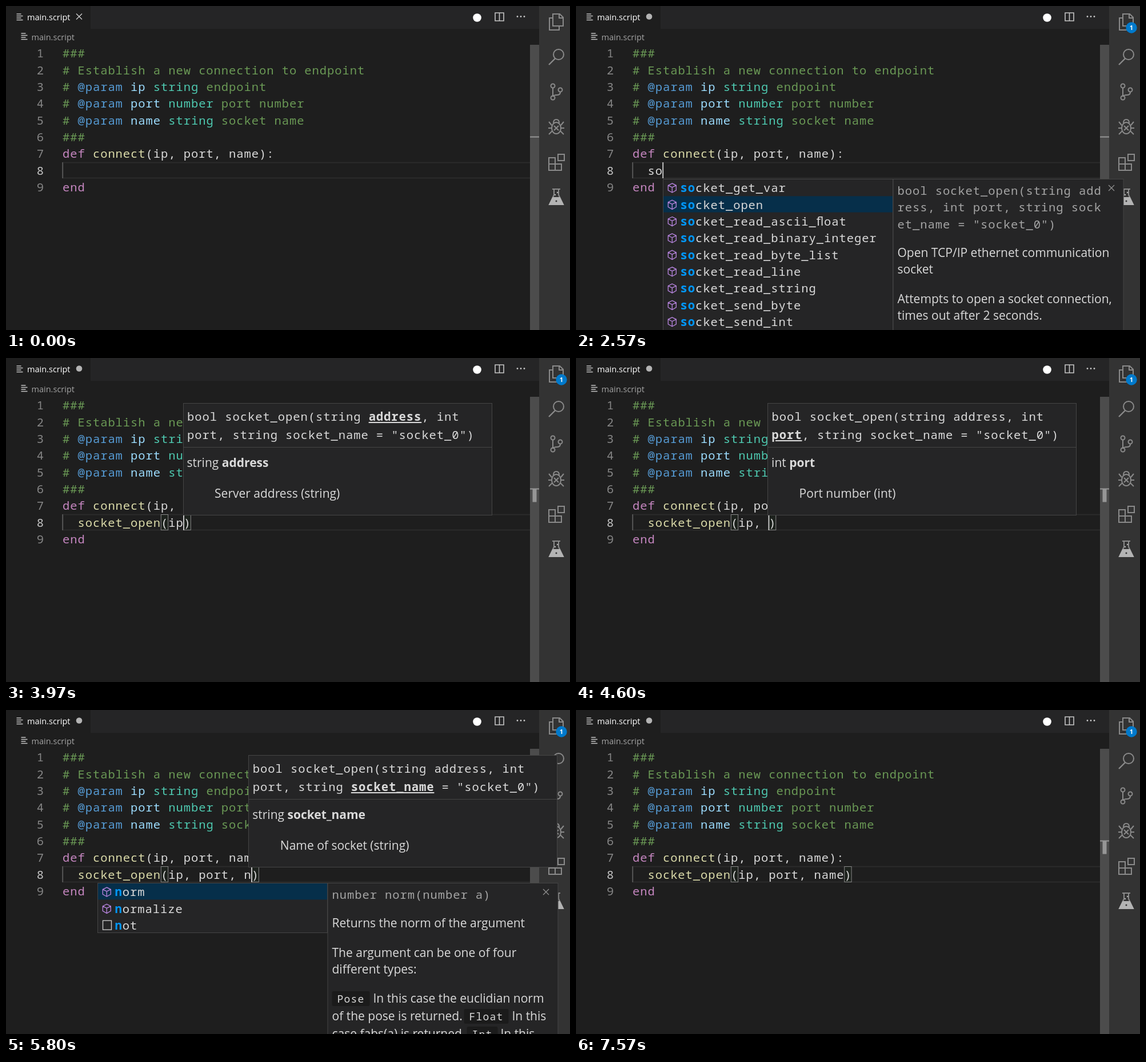
Write an HTML page that moves like this. It is 987x568 px and loops after 8.01 s.

```html
<!DOCTYPE html>
<html lang="en">
<head>
<meta charset="utf-8">
<title>Editor completion</title>
<style>
html, body { margin: 0; width: 100%; height: 100%; overflow: hidden; background: #1e1e1e; }
svg { display: block; width: 987px; height: 568px; }
text { white-space: pre; font-family: "Open Sans", "Noto Sans", sans-serif; }
.mono { font: 500 20.5px "Noto Sans Mono", "DejaVu Sans Mono", monospace; letter-spacing: .93px; }
.chip { font: 500 18px "Noto Sans Mono", "DejaVu Sans Mono", monospace; letter-spacing: 1.2px; }
.body { font-size: 21px; }
.ui { font-size: 14.5px; }
.b { font-weight: 700; }
.u { font-weight: 700; text-decoration: underline; text-decoration-skip-ink: none; }
</style>
</head>
<body>
<svg id="stage" viewBox="0 0 987 568" xmlns="http://www.w3.org/2000/svg"></svg>
<script>
const LOOP = 8010, CH = 13.23, LINE = 29.35, LEFT = 99;
const C = { text: '#dadada', comment: '#6a9955', tag: '#569cd6', name: '#9cdcfe', type: '#4ec9b0',
  key: '#c586c0', fn: '#dcdcaa', match: '#0097fb', dim: '#a4a4a4', icon: '#8a8a8a',
  panel: '#252526', edge: '#454545', mark: '#969696' };

// Text on the edited line, "|" marks the caret
const call = s => `socket_open(${s}|)`;
const keys = [
  [0, '|'], [930, 's|'], [2030, 'so|'], [2830, 'socket_open|'], [2870, call('')],
  [3730, call('i')], [3830, call('ip')], [4230, call('ip,')], [4300, call('ip, ')],
  [4770, call('ip, p')], [4900, call('ip, po')], [5030, call('ip, por')], [5230, call('ip, port')],
  [5400, call('ip, port,')], [5500, call('ip, port, ')], [5600, call('ip, port, n')],
  [5880, call('ip, port, na')], [5950, call('ip, port, nam')], [6030, call('ip, port, name')],
  [7000, 'socket_open(ip, port, name)|']
];
const caretOff = [[0, 130], [630, 930], [3370, 3730], [6530, 7000], [7570, LOOP]];

const params = [
  ['string', 'address', 'Server address (string)'],
  ['int', 'port', 'Port number (int)'],
  ['string', 'socket_name', 'Name of socket (string)']
];

const sockets = ['get_var', 'open', 'read_ascii_\uFB02oat', 'read_binary_integer', 'read_byte_list', 'read_line',
  'read_string', 'send_byte', 'send_int', 'send_line'].map(s => 'socket_' + s);
const openDoc = {
  head: ['bool socket_open(string add', 'ress, int port, string sock', 'et_name = "socket_0")'],
  body: [[440, 'Open TCP/IP ethernet communication'], [469, 'socket'],
    [521, 'Attempts to open a socket connection,'], [550, 'times out after 2 seconds.']]
};
const powerDoc = {
  head: ['void powerdown()'], bottom: 421,
  body: [[381, 'Shutdown the robot, and power off the'], [410, 'robot and controller.']]
};
const normDoc = {
  head: ['number norm(number a)'],
  body: [[381, 'Returns the norm of the argument'], [433, 'The argument can be one of four'],
    [462, 'different types:'], [513, 'In this case the euclidian norm', 72],
    [544, 'of the pose is returned.'], [544, 'In this', 315],
    [575, 'case fabs(a) is returned.'], [575, 'In this', 295]],
  chips: [[0, 493, 'Pose'], [231, 524, 'Float'], [236, 555, 'Int']]
};
const invDoc = {
  head: ['pose inv(pose p)'], bottom: 421,
  body: [[381, 'Get the inverse of a pose or of a'], [410, 'list of joint values.']]
};
const lists = [
  { from: 1000, to: 2030, docAt: 1070, x: 139, q: 's', items: sockets.slice(1), sel: 0, doc: openDoc, bars: true },
  { from: 2030, to: 2830, x: 152, q: 'so', items: sockets.slice(0, 9), sel: 1, doc: openDoc },
  { from: 3760, to: 3870, x: 160, q: 'i', sel: 0, doc: invDoc,
    items: ['inv', 'if', 'int', 'is_steady', 'is_in_range', 'is_idle', 'integrate', 'invert', 'index_of'] },
  { from: 4800, to: 5030, x: 160, q: 'p', sel: 0, doc: powerDoc,
    items: ['powerdown', 'pose_add', 'pose_dist', 'pose_inv', 'pose_sub', 'pose_trans', 'popup', 'pow',
      'position_deviation_warning'] },
  { from: 5030, to: 5230, x: 160, q: 'por', sel: 0, doc: powerDoc,
    items: ['powerdown', 'pose_trans', 'position_deviation_warning'] },
  { from: 5640, to: 5880, x: 160, q: 'n', sel: 0, doc: normDoc, items: ['norm', 'normalize', 'not'] }
];

const esc = s => s.replace(/&/g, '&amp;').replace(/</g, '&lt;');
const span = (s, fill, cls = '') => `<tspan fill="${fill}" class="${cls}">${esc(s)}</tspan>`;
const text = (x, y, inner, cls = 'mono', more = '') => `<text x="${x}" y="${y}" class="${cls}" ${more}>${inner}</text>`;
const rect = (x, y, w, h, fill, stroke = 'none', more = '') =>
  `<rect x="${x}" y="${y}" width="${w}" height="${h}" fill="${fill}" stroke="${stroke}" ${more}/>`;
const path = (d, stroke, w = 1, fill = 'none') => `<path d="${d}" stroke="${stroke}" stroke-width="${w}" fill="${fill}"/>`;
const circle = (x, y, r, fill, stroke = 'none') =>
  `<circle cx="${x}" cy="${y}" r="${r}" fill="${fill}" stroke="${stroke}" stroke-width="2"/>`;
const cross = (x, y, r, col) => path(`M${x - r} ${y - r}l${2 * r} ${2 * r}m0 ${-2 * r}l${-2 * r} ${2 * r}`, col, 1.3);
const baseline = n => 90.2 + LINE * (n - 1);
const fileIcon = (x, y) => path(`M${x} ${y}h8m-8 3.5h11m-11 3.5h8m-8 3.5h11`, '#c5c5c5', 1.5);

const g = s => span(s, C.comment);
const param = (name, type, rest) =>
  g('# ') + span('@param', C.tag) + span(` ${name} `, C.name) + span(type, C.type) + g(' ' + rest);
const lines = [
  g('###'), g('# Establish a new connection to endpoint'),
  param('ip', 'string', 'endpoint'), param('port', 'number', 'port number'), param('name', 'string', 'socket name'),
  g('###'), span('def ', C.key) + span('connect', C.fn) + span('(ip, port, name):', C.text), '', span('end', C.key)
];

function activityBar(dirty) {
  const p = (d, w = 2) => path(d, C.icon, w);
  let s = rect(933, 0, 54, 568, '#333333');
  s += p('M957 14h12l6 6v15h-18zM968 14v7h7M957 21h-6v21h17v-7');
  s += circle(967, 85, 9, 'none', C.icon) + p('M961 92L950 103', 2.4);
  s += circle(957, 140, 3.5, 'none', C.icon) + circle(970, 147, 3.5, 'none', C.icon) +
    circle(957, 161, 3.5, 'none', C.icon) + p('M957 144v13M970 151q0 5-6 5t-7 3');
  s += '<ellipse cx="963" cy="214" rx="8" ry="10" fill="none" stroke="#8a8a8a" stroke-width="2"/>' +
    p('M958 205q0-6 5-6t5 6M955 209l-5-6M971 209l5-6M955 214h-6M971 214h6M956 219l-6 6M970 219l6 6M959 210l8 8m0-8l-8 8');
  s += p('M950 266h11v22h-11zM950 277h22v11h-11M966 260h11v11h-11z');
  s += p('M956 321h14M959 321v10l-8 17h24l-8-17v-10') + path('M957 336h12l6 12h-24z', '#b4b4b4', 2, '#b4b4b4') +
    circle(961, 331, 1.2, '#b4b4b4') + circle(965, 327, 1.2, '#b4b4b4') + circle(963, 342, 1.5, '#333');
  if (dirty) s += circle(972, 38, 9.7, '#007acc') + text(972, 42, span('1', '#fff'), 'b', 'font-size="11" text-anchor="middle"');
  return s;
}

function frameTop(dirty) {
  let s = rect(0, 0, 933, 40, C.panel) + rect(0, 0, 148, 40, '#1e1e1e');
  s += fileIcon(18.5, 14) + text(37, 25, span('main.script', '#fff'), 'ui');
  s += dirty ? circle(128, 18.5, 5.3, '#b4b4b4') : cross(128, 18.5, 5, '#d0d0d0');
  s += circle(824.5, 20.5, 7.3, '#fff');
  s += path('M856 12h15v14h-15zM863.5 12v14', '#c5c5c5', 1.6);
  for (const x of [895, 901, 907]) s += circle(x, 18.5, 1.4, '#c5c5c5');
  return s + fileIcon(26.5, 48) + text(44.5, 60, span('main.script', C.dim), 'ui');
}

function editor(line, caret) {
  const at = line.indexOf('|'), code = line.replace('|', ''), open = code.indexOf('(');
  let s = rect(99.5, 274.5, 832, 27, 'none', '#2b2b2b', 'stroke-width="2"') + rect(98.5, 274, 1.2, 28, '#707070');
  lines.forEach((l, i) => {
    const y = baseline(i + 1);
    s += text(67, y, span(String(i + 1), i === 7 ? '#c6c6c6' : '#858585'), 'mono', 'text-anchor="end"') + text(LEFT, y, l);
  });
  const x0 = LEFT + 2 * CH;
  if (open > 0) {
    for (const i of [open, code.length - 1]) s += rect(x0 + i * CH + .3, 274.5, CH - .9, 27, '#1d221d', '#888');
  }
  const cut = open < 0 ? 0 : open;
  s += text(x0, baseline(8), span(code.slice(0, cut), C.fn) + span(code.slice(cut), C.text));
  if (caret) s += rect(x0 + at * CH - .6, 274, 1.8, 28, '#d0d0d0');
  s += rect(917, 68, 16, 500, '#4c4c4c') + rect(917, 228.5, 16, 2, C.mark);
  if (open > 0) s += rect(921.5, 230, 7, 22.5, C.mark);
  return s;
}

function matched(item, q) {
  let k = 0;
  return [...item].map(c => c === q[k] ? (k++, span(c, C.match, 'b')) : span(c, C.text)).join('');
}

function cube(x, y) {
  return path(`M${x} ${y - 8}l7 3.5v8.5l-7 4-7-4v-8.5zM${x - 7} ${y - 4.5}l7 3.5 7-3.5M${x} ${y - 1}v9`, '#b180d7', 1.4);
}

function docPanel(x, doc, bar) {
  const w = 404, left = x + 8;
  let s = rect(x + .5, 303.5, w - 1, (doc.bottom || 600) - 303, C.panel, C.edge);
  if (bar) s += rect(x + w - 12, 304, 11, 300, '#3a3a3a');
  doc.head.forEach((h, i) => s += text(left, 331 + i * LINE, span(h, C.dim)));
  for (const [y, str, dx = 0] of doc.body) s += text(left + dx, y, span(str, C.text), 'body');
  for (const [dx, y, str] of doc.chips || []) {
    s += rect(left + dx, y, str.length * 12 + 18, 26, '#1b1b1b', 'none', 'rx="3"') +
      text(left + dx + 9, y + 20, span(str, C.text), 'chip');
  }
  return s + cross(x + w - 21.5, 319, 5, '#909090');
}

function suggest(l, t) {
  const w = 403, h = l.items.length > 3 ? 300 : 87;
  let s = rect(l.x + .5, 303.5, w - 1, h, C.panel, C.edge);
  l.items.forEach((item, i) => {
    const y = 319 + i * LINE;
    if (i === l.sel) s += rect(l.x + 1, y - 15, w - 2, LINE - 1, '#062f4a');
    s += item === 'not' ? rect(l.x + 9.5, y - 8.5, 15, 16, 'none', '#c5c5c5', 'stroke-width="1.4"') : cube(l.x + 16.3, y);
    s += text(l.x + 30.5, y + 7.2, matched(item, l.q));
  });
  const bars = l.bars && t < 1650;
  if (bars) s += rect(l.x + w - 14, 520, 13, 60, '#4c4c4c');
  return s + (t >= (l.docAt || 0) ? docPanel(l.x + w - 1 + (l.bars ? 0 : .5), l.doc, bars) : '');
}

function signature(args) {
  const x = Math.min(284.6 + 12.75 * args.length, 430), active = args.split(',').length - 1;
  const p = i => span(params[i][1], C.text, i === active ? 'u' : ''), t = s => span(s, C.text);
  const [type, name, about] = params[active];
  return rect(Math.floor(x) + .5, 79.5, 540, 196, C.panel, C.edge) +
    path(`M${Math.floor(x) + 1} 156.5h539`, C.edge) +
    text(x + 7, 110, t('bool socket_open(string ') + p(0) + t(', int')) +
    text(x + 7, 142, p(1) + t(', string ') + p(2) + t(' = "socket_0")')) +
    text(x + 6.5, 190.5, t(type + ' ') + span(name, C.text, 'b'), 'body') +
    text(x + 55, 244.5, t(about), 'body');
}

const stage = document.getElementById('stage');
let last = '';

function draw(t) {
  const line = keys.filter(k => k[0] <= t).pop()[1];
  const dirty = line !== '|';
  const caret = !caretOff.some(([a, b]) => t >= a && t < b);
  const list = lists.find(l => t >= l.from && t < l.to);
  const args = line.match(/\((.*)\|\)/);
  const html = rect(0, 0, 987, 568, '#1e1e1e') + frameTop(dirty) + editor(line, caret) + activityBar(dirty) +
    (list ? suggest(list, t) : '') + (args ? signature(args[1]) : '');
  if (html !== last) stage.innerHTML = last = html;
}

const start = performance.now();
function tick() {
  draw((performance.now() - start) % LOOP);
  requestAnimationFrame(tick);
}
tick();
</script>
</body>
</html>
```
